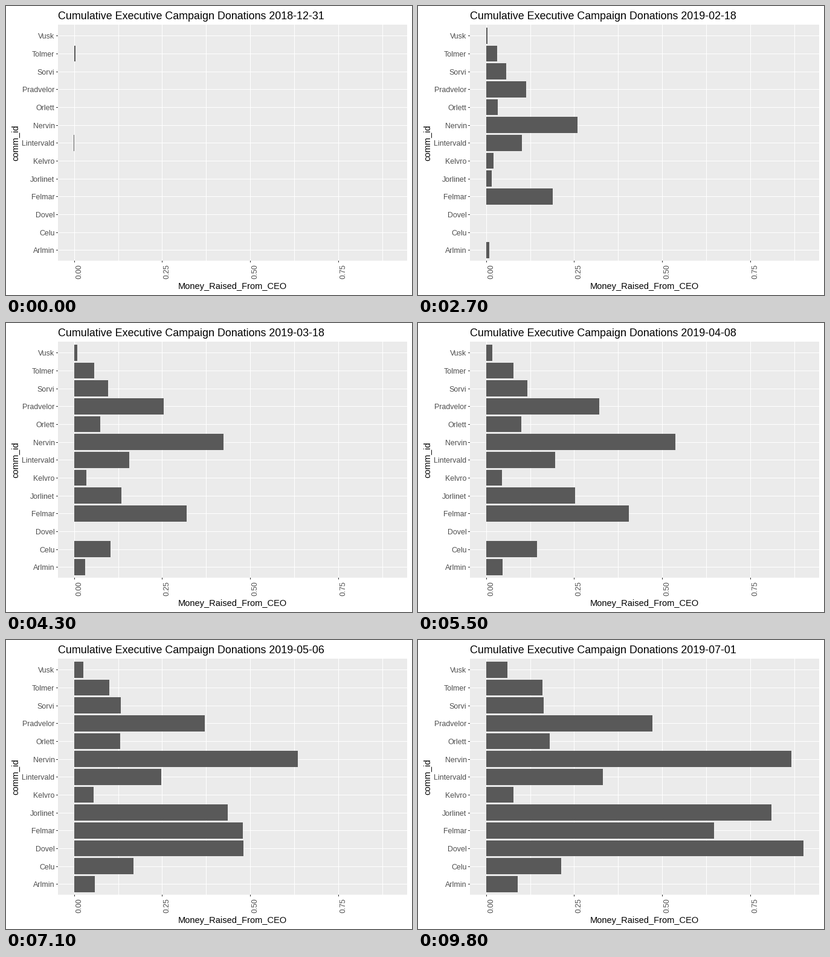
Recreate the animation shown at these times as a matplotlib script. Size 672x480 px, loop 10 s.

```python
import numpy as np
import matplotlib.pyplot as plt
from matplotlib.animation import FuncAnimation
from matplotlib.patches import Rectangle

plt.rcParams["font.family"] = "Liberation Sans"

W, H, DPI = 672, 480, 96
LEFT, RIGHT, TOP, BOTTOM = 86, 664, 31, 423
ZERO = 113                                  # x of the bars' base line
GRID_X0, GRID_STEP = 112.7, 72.85
ROW0, ROW_STEP, BAR_H = 49.2, 89 / 3, 26.7
START = np.datetime64("2018-12-31")
GREY = "#4D4D4D"


def steady(week):
    return np.interp(week, (0, 25), (0, 1))


def seasonal(week):
    """Money comes faster towards the end of each quarter."""
    return np.interp(week, (0, 14, 22, 25), (0, 0.6, 0.83, 1))


def growth(total, launch, power, opening=0, clock=seasonal):
    """Bar length by week: from the opening sum at launch up to the total."""
    def length(week):
        begin = clock(launch)
        t = max(0, (clock(week) - begin) / (1 - begin))
        return opening + (total - opening) * t ** power
    return length


CAMPAIGNS = {
    "Vusk": growth(35, 0, 2.5),
    "Tolmer": growth(93, 0, 1.45, opening=2),
    "Sorvi": growth(95, 5, 0.48),
    "Pradvelor": growth(275, 6, 0.5),
    "Orlett": growth(105, 5, 0.74, clock=steady),
    "Nervin": growth(505, 2, 0.83),
    "Lintervald": growth(193, 1, 0.85, opening=-1, clock=steady),
    "Kelvro": growth(45, 1, 1),
    "Jorlinet": growth(472, 6, 1.35, clock=steady),
    "Felmar": growth(377, 3, 0.76),
    "Dovel": growth(525, 15, 0.43),
    "Celu": growth(124, 9, 0.37),
    "Arlmin": growth(52, 6, 0.85),
}

fig = plt.figure(figsize=(W / DPI, H / DPI), dpi=DPI, facecolor="white")
ax = fig.add_axes([0, 0, 1, 1])
ax.set_xlim(0, W)
ax.set_ylim(H, 0)
ax.axis("off")


def rect(x, y, w, h, color, z=1):
    patch = Rectangle((x, y), w, h, facecolor=color, linewidth=0,
                      antialiased=False, zorder=z)
    return ax.add_patch(patch)


def text(x, y, s, px, color="black", **kw):
    return ax.text(x, y, s, fontsize=px * 72 / DPI, color=color,
                   va="baseline", rotation_mode="anchor", **kw)


def week_at(frame):
    """Hold each week, with one halfway frame before the next."""
    if frame < 83:
        week, part = divmod(frame + 1, 4)
        return week + 0.5 * (part == 3)
    week, part = divmod(frame - 83, 3)
    return 21 + week + 0.5 * (part == 2)


# panel, grid and axes
rect(LEFT, TOP, RIGHT - LEFT, BOTTOM - TOP, "#EBEBEB", 0)
for i in range(8):
    x = round(GRID_X0 + i * GRID_STEP)
    rect(x, TOP, 1, BOTTOM - TOP, "white")
    if i % 2 == 0:
        rect(x, BOTTOM, 1, 3, "#333333")
        text(x + 11.3, 429, f"{i / 8:.2f}", 12.4, GREY, rotation=90, ha="right")

bars = []
for i, name in enumerate(CAMPAIGNS):
    y = ROW0 + i * ROW_STEP
    rect(LEFT, round(y), RIGHT - LEFT, 1, "white")
    rect(LEFT - 3, round(y), 3, 1, "#333333")
    text(80.5, y + 5.2, name, 12.4, GREY, ha="right")
    top, bottom = round(y - BAR_H / 2), round(y + BAR_H / 2)
    bars.append(rect(ZERO, top, 0, bottom - top, "#595959", 2))

text(374.5, 470, "Money_Raised_From_CEO", 14.67, ha="center")
text(19, 227.5, "comm_id", 14.67, rotation=90, ha="center")
title = text(86, 22, "", 17.85, ha="left")


def update(frame):
    week = week_at(frame)
    for bar, length in zip(bars, CAMPAIGNS.values()):
        bar.set_width(round(length(week)))
    title.set_text(f"Cumulative Executive Campaign Donations {START + 7 * int(week)}")
    return [*bars, title]


anim = FuncAnimation(fig, update, frames=100, interval=100,
                     repeat=True, repeat_delay=0, blit=False)
plt.show()
```
